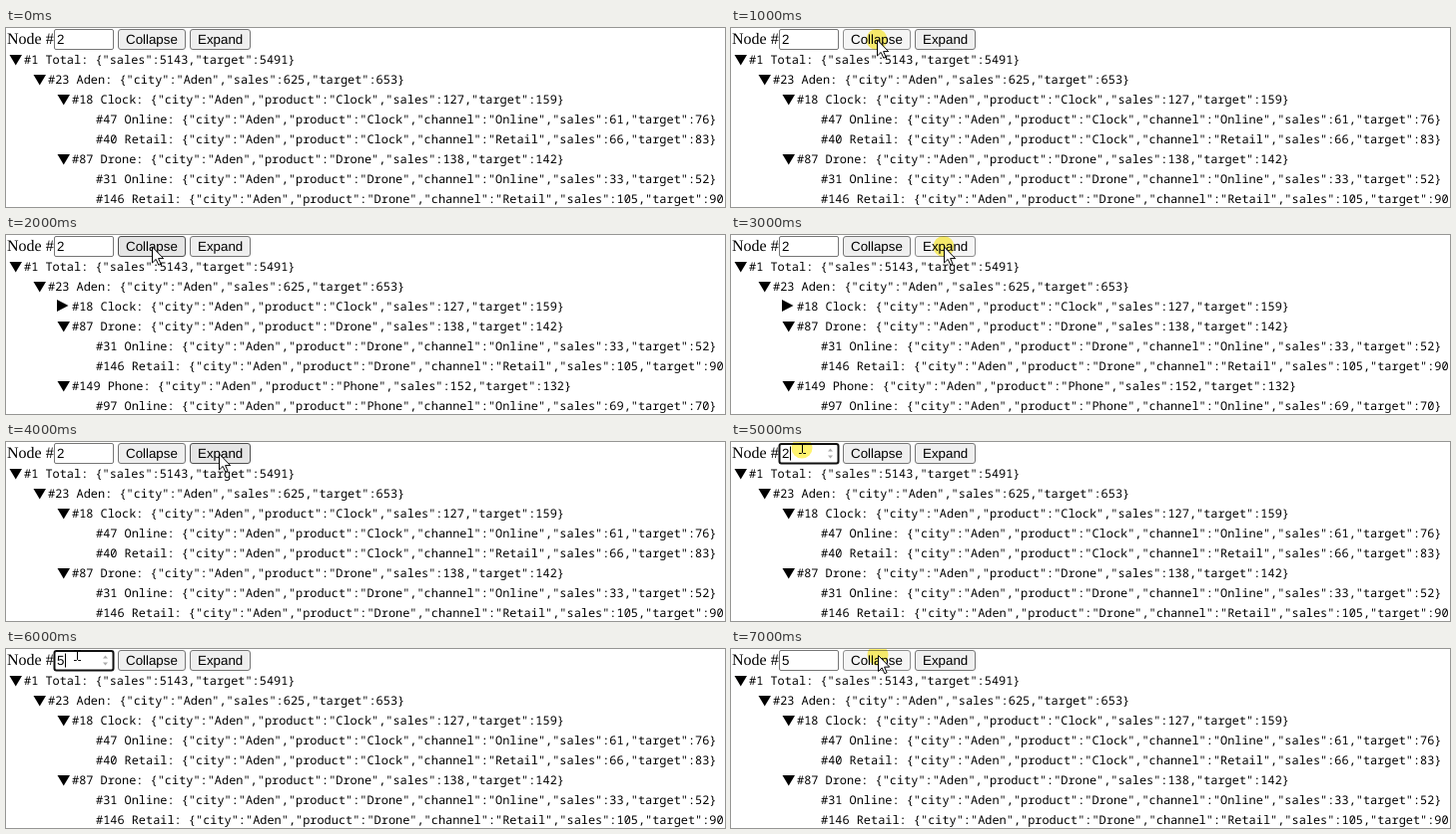
These frames come from a looping animation (720 px wide and 180 px high, 8000 ms). An HTML page:

```html
<!DOCTYPE html>
<html lang="en">
<head>
<meta charset="utf-8">
<title>Collapsible tree</title>
<style>
  html, body { margin: 0; width: 100%; height: 100%; overflow: hidden; background: #fff; }
  svg { display: block; width: 720px; height: 180px; }
  text { white-space: pre; text-rendering: geometricPrecision; }
  .label { font: 16px "Liberation Serif", serif; }
  .control { font: 13.333px "Liberation Sans", sans-serif; }
  .row { font: 11.911px "Noto Sans Mono", monospace; }
  .press { fill: #ffee32; fill-opacity: .7; mix-blend-mode: multiply; }
</style>
</head>
<body>
<svg id="stage" viewBox="0 0 720 180"></svg>
<script>
const STEP = 1000;
const stage = document.getElementById("stage");

const node = (depth, id, name, data, children = []) => ({ depth, id, name, data, children });

function product(id, name, sales, target, channels) {
  const base = { city: "Aden", product: name };
  return node(2, id, name, { ...base, sales, target }, channels.map(([id, channel, sales, target]) =>
    node(3, id, channel, { ...base, channel, sales, target })));
}

const tree = node(0, 1, "Total", { sales: 5143, target: 5491 }, [
  node(1, 23, "Aden", { city: "Aden", sales: 625, target: 653 }, [
    product(18, "Clock", 127, 159, [[47, "Online", 61, 76], [40, "Retail", 66, 83]]),
    product(87, "Drone", 138, 142, [[31, "Online", 33, 52], [146, "Retail", 105, 90]]),
    product(149, "Phone", 152, 132, [[97, "Online", 69, 70]])
  ])
]);

const steps = [
  { value: 2 },
  { value: 2, over: "Collapse", pressed: true, at: [146, 11.5] },
  { value: 2, over: "Collapse", closed: 18, at: [146, 11.5] },
  { value: 2, over: "Expand", pressed: true, closed: 18, at: [213, 11.5] },
  { value: 2, over: "Expand", at: [213, 11.5] },
  { value: 2, focus: true, pressed: true, at: [71, 6] },
  { value: 5, focus: true, at: [71, 6] },
  { value: 5, over: "Collapse", pressed: true, at: [147, 6] }
];

const text = (kind, x, y, content) => `<text class="${kind}" x="${x}" y="${y}">${content}</text>`;

function visible(item, closed) {
  if (item.id === closed) return [item];
  return [item, ...item.children.flatMap(child => visible(child, closed))];
}

function row(item, index, closed) {
  const x = item.depth * 24, y = 20 * index + 27;
  const arrow = item.id === closed
    ? `M${x + 3} ${y - 2}l11.5 6l-11.5 6z`
    : `M${x + 3.5} ${y}h12.5l-6.25 10.5z`;
  return (item.children.length ? `<path d="${arrow}"/>` : "") +
    text("row", x + 18, y + 9, `#${item.id} ${item.name}: ${JSON.stringify(item.data)}`);
}

function button(name, x, width, { over, pressed }) {
  const [fill, stroke] = over !== name ? ["#efefef", "#767676"]
    : pressed ? ["#f5f5f5", "#8d8d8d"] : ["#e5e5e5", "#4f4f4f"];
  return `<rect x="${x + .5}" y="1.5" width="${width - 1}" height="20" rx="2.5" fill="${fill}" stroke="${stroke}"/>` +
    text("control", x + 8, 16, name);
}

function field({ value, focus }) {
  const box = focus
    ? `<rect x="48.5" y="2" width="59" height="19.5" rx="2" fill="#fff" stroke="#101010" stroke-width="2"/>
       <path d="M59.5 4.5v14" stroke="#000"/>
       <path d="M97 9.5l2.5-3l2.5 3zM97 13.5l2.5 3l2.5-3z" fill="#aaa"/>`
    : `<rect x="48.5" y="1.5" width="59" height="20" rx="1.5" fill="#fff" stroke="#767676"/>`;
  return box + text("control", 51, 16, value);
}

function pointer({ at, pressed, focus }) {
  if (!at) return "";
  const [x, y] = at;
  const halo = pressed ? `<circle class="press" cx="${x}" cy="${y}" r="10.5"/>` : "";
  const shape = focus
    ? `<path d="M-3 -4.5h2.5l1 1l1 -1h2.5M.5 -3.5v8M-3 5.5h2.5l1 -1l1 1h2.5" fill="none" stroke="#000"/>`
    : `<path d="M.5 .5v16l3.7 -3.6l2.6 5.8l2.3 -1l-2.5 -5.6h5.1z" fill="#fff" stroke="#000"/>`;
  return `${halo}<g transform="translate(${x} ${y})">${shape}</g>`;
}

function draw(state) {
  stage.innerHTML =
    text("label", 1, 16, "Node #") + field(state) +
    button("Collapse", 112, 68, state) + button("Expand", 184, 61, state) +
    visible(tree, state.closed).slice(0, 8).map((item, i) => row(item, i, state.closed)).join("") +
    pointer(state);
}

let shown = -1;
function frame() {
  const index = Math.floor(performance.now() / STEP) % steps.length;
  if (index !== shown) draw(steps[shown = index]);
  requestAnimationFrame(frame);
}
frame();
</script>
</body>
</html>
```
